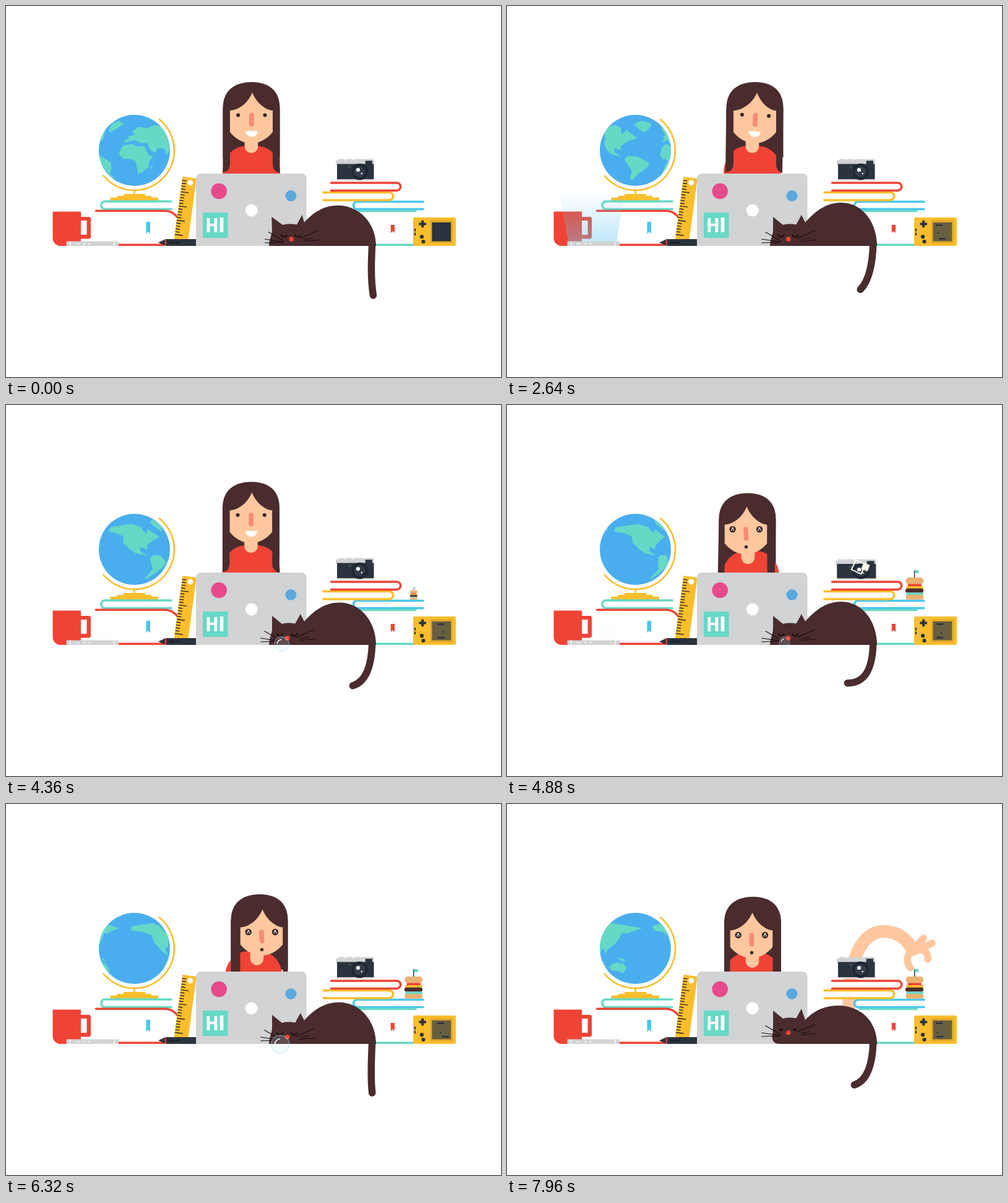
These frames come from a looping animation (800 px wide and 600 px high, 8000 ms). An HTML page:

```html
<!DOCTYPE html>
<html lang="en">
<head>
<meta charset="utf-8">
<title>Desk</title>
<style>
html, body { margin: 0; width: 100%; height: 100%; overflow: hidden; background: #fff; }
svg { display: block; width: 100vw; height: 100vh; }
.line { fill: none; stroke-width: 3.5; stroke-linecap: round; }
.red { fill: #ef4335; } .teal { fill: #66d9c6; } .yellow { fill: #fabe2c; }
.dark { fill: #2b333e; } .gray { fill: #d1d3d4; } .hair { fill: #4a2c2e; }
.skin { fill: #ffc79e; } .white { fill: #fff; }
</style>
</head>
<body>
<svg viewBox="0 0 800 600">
  <defs>
    <clipPath id="globeClip"><circle cx="207.5" cy="233.5" r="57.5"/></clipPath>
    <linearGradient id="glowFill" x1="0" y1="300" x2="0" y2="381" gradientUnits="userSpaceOnUse">
      <stop stop-color="#6ac9ee" stop-opacity="0"/>
      <stop offset="1" stop-color="#6ac9ee" stop-opacity=".42"/>
    </linearGradient>
  </defs>

  <!-- globe -->
  <circle cx="207.5" cy="233.5" r="57.5" fill="#4aaeee"/>
  <path id="land" class="teal" clip-path="url(#globeClip)"/>
  <path d="M248 183.5A64.5 64.5 0 1 1 157.5 274.5M207.5 298V306" class="line" stroke="#fabe2c" style="stroke-width:2.6"/>
  <path class="yellow" d="M190 304h35v3h10v2.700h11v5.500h-77.500v-5.500h11v-2.700h10.500z"/>

  <!-- left books -->
  <g class="line">
    <path d="M267 316H160a6.200 6.200 0 0 0 0 12.500H267" stroke="#66d9c6"/>
    <path d="M145.500 331.300H256C267 331.300 273 336 279 344M180 386.200H255" stroke="#ef4335"/>
  </g>
  <path d="M226.500 349h6.500v19.500l-3.200-3.500-3.300 3.500z" fill="#49c7ee"/>

  <!-- mug, phone, glow -->
  <path class="red" d="M75.500 332.500H121V341H134a3 3 0 0 1 3 3V373.500a3 3 0 0 1-3 3H121V388H88a12.500 12.500 0 0 1-12.500-12.500z"/>
  <path class="white" d="M121 347h9.500v23H121z"/>
  <path id="glow" d="M99 381L84 300H190.500L177 381z" fill="url(#glowFill)"/>
  <path class="gray" d="M97.500 380.500H182V388H97.500z"/>
  <path d="M103.500 380.500v7.500M175 380.500v7.500M112 384.500h7" stroke="#fff" stroke-width="1.200"/>
  <circle class="white" cx="126.500" cy="384.300" r="1.200"/><circle class="white" cx="134.500" cy="384.300" r="1.200"/>

  <!-- ruler and pen -->
  <g transform="translate(285.500 276) rotate(7.700)">
    <path class="yellow" d="M0 0H22.500V103H0z"/>
    <path id="ticks" stroke="#2b2320" stroke-width="1.400"/>
    <circle class="white" cx="13.500" cy="8" r="4.500"/>
  </g>
  <path class="dark" d="M246 382.500L258 377H312.500V379H316a2 2 0 0 1 2 2V384a2 2 0 0 1-2 2H312.500V388H258z"/>
  <path class="red" d="M256.800 377.500h2v10.300h-2z"/>
  <path d="M265 382.500h6M274 382.500h6" stroke="#1b212a" stroke-width="3" stroke-linecap="round"/>

  <!-- person -->
  <path id="hairBack" class="hair"/>
  <path id="body" class="red" d="M350 290V271C350 243 368 226.500 388 226.500H405C427 226.500 443 243 443 271V290z"/>
  <path id="neck" class="skin" d="M385.700 212H407.200V227a10.750 10.750 0 0 1-21.500 0z"/>
  <path id="face" class="skin"/>
  <path id="hairFront" class="hair"/>
  <g id="features">
    <g id="dotEyes" fill="#3b2426"><circle cx="375.200" cy="176.500" r="3"/><circle cx="418.500" cy="176.500" r="3"/></g>
    <path id="happyEyes" d="M369.500 179a5.700 5.700 0 0 1 11.400 0M412.800 179a5.700 5.700 0 0 1 11.400 0" class="line" stroke="#3b2426" style="stroke-width:2.600"/>
    <g id="bigEyes"></g>
    <rect id="nose" x="393" y="172.800" width="7.600" height="22.200" rx="3.800" fill="#f78b78"/>
    <path id="smile" class="white" d="M387.500 202.300H406.500C406.500 208 402 211.700 397 211.700S387.500 208 387.500 202.300z"/>
    <circle id="gasp" cx="397" cy="205" r="2.700" fill="#3b2426"/>
  </g>

  <!-- laptop -->
  <path class="gray" d="M307 388V279a8 8 0 0 1 8-8H477.500a8 8 0 0 1 8 8V388z"/>
  <circle cx="344.200" cy="299.500" r="12.800" fill="#e64a8b"/>
  <circle cx="460.500" cy="307" r="9" fill="#5aa9de"/>
  <circle class="white" cx="396.700" cy="330.500" r="10"/>
  <path class="teal" d="M318 334h40.500v41H318z"/>
  <g class="white" font-size="33" font-weight="900">
    <text x="323" y="366" font-family="'Noto Sans Mono', monospace">H</text>
    <text x="343.500" y="366" font-family="Roboto, sans-serif">I</text>
  </g>

  <!-- arm behind the right books -->
  <g id="arm">
    <path id="armLine" d="M552 334C553 295 556 270 562 252C572 218 592 206 608 206C628 206 645 215 655 236" fill="none" stroke="#ffc79e" stroke-width="20.500"/>
    <g id="hand"><path d="M-1 3L18-19M6 2L32-11M-3 29C-11 20-9 2 5-1C17-3 26 4 25 15" class="line" stroke="#ffc79e" style="stroke-width:11.500"/><circle class="skin" r="10"/></g>
  </g>

  <!-- right books -->
  <g class="line">
    <path d="M674 316.500H567.500a6 6 0 0 0 0 12H674" stroke="#49c7ee" fill="#fff"/>
    <path d="M570 331.500H662M595 386.200H662" stroke="#66d9c6"/>
    <path d="M513 301.500H619.500a6.200 6.200 0 0 1 0 12.400H513" stroke="#fabe2c" fill="#fff"/>
    <path d="M525.500 286H631.500a6.200 6.200 0 0 1 0 12.400H525.500" stroke="#ef4335" fill="#fff"/>
  </g>
  <path class="red" d="M621.800 354h6.200v13l-3.100-2.800-3.100 2.800z"/>

  <!-- camera -->
  <g id="camera">
    <path class="gray" d="M533 249.500H537V247.500H547V249.500H549V247.500H560V249.500H562V247.500H594.500V257H533zM535 279.500H594.500V282.500H535z"/>
    <path class="dark" d="M535 255.500H594.500V280H535zM580.700 250.300H592V259.500H580.700z"/>
    <circle cx="571.500" cy="268" r="13.300" fill="#1f2733"/><circle cx="571.500" cy="268" r="9" fill="#333d4b"/>
    <circle class="white" cx="569" cy="265" r="3.100"/><circle class="white" cx="574.700" cy="271" r="1.200"/>
    <circle cx="555.500" cy="260" r="2" fill="#45505c"/>
  </g>
  <g id="flash">
    <path d="M-8.500-8.500h17v17h-17z" transform="translate(568 262) rotate(25)" fill="none" stroke="#fff9ee" stroke-width="2"/>
    <path d="M-5.500-5.500h11v11h-11z" transform="translate(579.500 262) rotate(20)" fill="#fff9ee"/>
  </g>

  <!-- burger -->
  <g id="burger">
    <path d="M658.700 267V281" stroke="#2b333e" stroke-width="1.500"/>
    <path class="teal" d="M659.500 267h6v5h-6z"/>
    <rect x="644.500" y="279" width="28.500" height="11" rx="5" fill="#e9b072"/>
    <rect class="red" x="647.500" y="289.500" width="22.500" height="3.800" rx="1.500"/>
    <rect class="yellow" x="645" y="293" width="28" height="4" rx="1.500"/>
    <rect class="hair" x="644" y="296.700" width="29" height="6.800" rx="3"/>
    <rect class="teal" x="645" y="303.500" width="28" height="3.800" rx="1.500"/>
    <rect x="644.500" y="307" width="28.500" height="7.700" rx="3" fill="#e9b072"/>
  </g>

  <!-- handheld console -->
  <rect class="yellow" x="658" y="342" width="69" height="46" rx="2.500"/>
  <path d="M685.500 346.500h36.500v37h-36.500z" fill="#e3a829"/>
  <path id="screen" d="M688.500 350H719V380.500H688.500z"/>
  <path id="game" stroke="#2b333e" stroke-width="2.400"/>
  <path d="M667.500 352.500h11.500M673.200 346.800v11.400" stroke="#2b333e" stroke-width="4"/>
  <circle class="dark" cx="672" cy="373.200" r="3.100"/><circle class="dark" cx="674.500" cy="381" r="3.100"/>
  <path d="M661 360v4.500M661 366.500v4.500" stroke="#2b333e" stroke-width="2"/>

  <!-- cat -->
  <path id="tail" class="line" stroke="#4a2c2e" style="stroke-width:11.500"/>
  <path id="cat" class="hair"/>
  <g id="catFace" fill="none" stroke="#150c0d">
    <path d="M449 380L424 365.500M448 381.500L418 377M448 382L418 383M475 376L504 363.500M482 377.500L496 375.500M481 380.500L506 378.500" stroke-width="1.100"/>
    <path id="catShut" d="M445 369.500a4.500 4 0 0 0 9 0M467.500 369.500a4.500 4 0 0 0 9 0" stroke-width="2"/>
    <path id="catOpen" d="M446.500 372h5.500M469 372h5.500" stroke-width="3"/>
    <circle class="red" cx="461.200" cy="377" r="3.800" stroke="none"/>
  </g>
  <g id="bubble">
    <circle r="1" fill="#bfe4f0" fill-opacity=".18" stroke="#a6e0f2" stroke-opacity=".5" stroke-width=".09"/>
    <path d="M-.6-.08A.6.6 0 0 1-.08-.6" fill="none" stroke="#fff" stroke-opacity=".85" stroke-width=".14" stroke-linecap="round"/>
  </g>
</svg>
<script>
const LOOP = 8000;
const $ = Object.fromEntries([...document.querySelectorAll('[id]')].map(e => [e.id, e]));
const set = (el, name, value) => el.setAttribute(name, value);
const show = (el, on) => set(el, 'opacity', +on);
const mix = (a, b, k) => a + (b - a) * k;
const ramp = (t, from, to) => {
  const k = Math.min(1, Math.max(0, (t - from) / (to - from)));
  return k * k * (3 - 2 * k);
};
const bump = (t, start, length) => {
  const k = (t - start) / length;
  return k > 0 && k < 1 ? Math.sin(Math.PI * k) ** 2 : 0;
};
const wave = (t, period, phase = 0) => Math.sin(2 * Math.PI * (t / period + phase));

// Outlines as pairs: longitude, height from the globe's middle
const africa = [-14,6, -9,-5, -3,-9, 10,-10, 17,-6, 28,-7, 37,9, 45,9, 38,18, 38,27, 29,35, 20,38, 14,17, 4,14, -6,14];
const eurasia = [-5,-12, -4,-17, 3,-19, 1,-23, 12,-25, 8,-31, 20,-38, 39,-36, 64,-41, 121,-39, 158,-35, 175,-33, 158,-28,
  147,-24, 135,-25, 134,-17, 123,-5, 109,2, 104,9, 95,-1, 79,8, 70,-3, 54,-4, 47,4, 37,-2, 34,-11, 22,-12, 12,-17];
const australia = [101,30, 117,25, 130,22, 134,26, 138,22, 143,32, 133,40, 120,36, 102,36];
const northAmerica = [-161,-29, -162,-36, -141,-38, -110,-41, -89,-36, -87,-30, -81,-26, -76,-33, -55,-20, -72,-14, -82,-7,
  -83,0, -94,-4, -94,3, -80,11, -102,6, -113,-2, -122,-11, -123,-21, -137,-26];
const greenland = [-62,-43, -38,-48, -15,-43, -25,-37, -40,-29, -50,-33];
const southAmerica = [-76,13, -70,9, -55,10, -33,20, -36,28, -52,38, -66,48, -73,46, -65,32, -75,19];
const newGuinea = [128,16, 137,16, 146,20, 136,20];
const madagascar = [42,29, 47,22, 46,30];
const continents = [africa, eurasia, australia, northAmerica, greenland, southAmerica, newGuinea, madagascar];

const wrap = a => ((a % 360) + 540) % 360 - 180;
function outline(points, centre) {
  const lons = points.filter((_, i) => i % 2 === 0);
  const middle = (Math.min(...lons) + Math.max(...lons)) / 2;
  const base = wrap(middle - centre);
  return 'M' + lons.map((lon, i) => {
    const y = points[2 * i + 1];
    const angle = Math.max(-90, Math.min(90, base + lon - middle));
    const x = Math.sqrt(57.5 ** 2 - y * y) * Math.sin(angle * Math.PI / 180);
    return `${(207.5 + x).toFixed(2)} ${233.5 + y}`;
  }).join('L') + 'z';
}

// Pose: hair x, hair y, face x, face y, tilt, nose tilt, hair end x, neck x
const rest = [0, 0, 0, 0, 0, 0, 0, 0];
const lean = [4, 0, 4, 0.3, 2.8, 0, 2.5, 0];
const duckLeft = [-8, 19.5, -10.5, 24.5, 0, -4, -10, -7];
const duckRight = [13, 23, 16.5, 30.5, 0, -5, 13, 9];
const duck = [0.5, 27, -1.5, 35.5, 0, 0, 0.5, 0];
const moves = [[900, 1250, lean], [2750, 3150, rest], [4300, 4700, duckLeft], [5950, 6320, duckRight], [6950, 7350, duck]];

function drawPerson(t) {
  let pose = rest;
  for (const [from, to, next] of moves) {
    const k = ramp(t, from, to);
    pose = pose.map((v, i) => mix(v, next[i], k));
  }
  const [dx, dy, fx, fy, tilt, noseTilt, ex, nx] = pose;
  const left = 350.5 + dx, right = 442.5 + dx, shoulder = 165 + dy, end = 269 + dy;
  const inL = 362 + fx, inR = 431 + fx, fringe = 169 + fy, part = 398 + fx + tilt * 0.7;
  set($.hairBack, 'd', `M${left} ${245 + dy}V${shoulder}C${left} ${139 + dy} ${367 + dx} ${123 + dy} ${397 + dx} ${123 + dy}
    S${right} ${139 + dy} ${right} ${shoulder}V${245 + dy}z`);
  set($.face, 'd', `M${part} ${140 + fy}C${part - 7} ${157 + fy} ${inL + 15} ${168 + fy} ${inL} ${fringe}V${204 + dy}
    C${inL + 10} ${216 + dy} ${inL + 22} ${222 + dy} ${inL + 34.5} ${222 + dy}S${inR - 10} ${216 + dy} ${inR} ${204 + dy}
    V${fringe}C${inR - 12} ${168 + fy} ${part + 7} ${157 + fy} ${part} ${140 + fy}z`);
  set($.hairFront, 'd', `M${left} ${shoulder}L${350.5 + ex} ${end}Q${inL - 1} ${end - 1} ${inL} ${end - 12}V${fringe - 4}z
    M${right} ${shoulder}L${442.5 + ex} ${end + 1}Q${inR + 1} ${end - 1} ${inR} ${end - 12}V${fringe - 4}z`);
  set($.body, 'transform', `translate(${nx * 0.4} ${dy * 0.5})`);
  set($.neck, 'transform', `translate(${nx} ${dy})`);
  set($.features, 'transform', `translate(${fx} ${fy}) rotate(${tilt} 397 190)`);
  set($.nose, 'transform', `rotate(${noseTilt} 397 184)`);

  const amazed = t > 4450, happy = t > 3250 && t < 4250;
  show($.dotEyes, !amazed && !happy);
  show($.happyEyes, happy);
  show($.bigEyes, amazed);
  show($.smile, !amazed);
  show($.gasp, amazed);
}

function drawCat(t) {
  const awake = ramp(t, 7150, 7450);
  const breath = ramp(t, 900, 1350) * (1 - awake);
  const inhale = Math.cos(Math.PI * (t - 2640) / 2240) ** 2;
  const b = breath * (0.25 + 0.75 * inhale);
  const top = 322.5 - 4.5 * b + 3.5 * awake, mid = 536 + 4 * b;
  const x = 3.5 * awake, up = -7 * awake, slide = -6.5 * ramp(t, 950, 2400);
  const corner = 12 * awake, ear = slide * 0.4;
  set($.cat, 'd', `M${425 + x + corner} 388Q${425 + x} 388 ${425 + x} ${388 - corner}
    C${425 + x} 378 430 370 430 ${362 + up}L${429.3 - ear * 0.3} ${341 + up}L${447 + ear * 0.4} ${354 + up}
    Q${458 + ear} ${351.5 + up} ${470 + ear} ${353.500 + up}L${478.5 + ear} ${338 + up}L482 ${350 + up * 0.1}
    C497 333 515 ${top} ${mid} ${top}C${mid + 36} ${top} 598 352 598 388z`);
  set($.catFace, 'transform', `translate(${slide} ${up})`);
  show($.catShut, awake < 0.5);
  show($.catOpen, awake >= 0.5);

  const swing = bump(t, 1150, 2000) + bump(t, 3450, 2700) + bump(t, 6150, 2700);
  const m = (a, c) => mix(a, c, swing);
  set($.tail, 'd', `M591.800 384C${m(590.5, 591)} ${m(410, 425)} ${m(589, 580)} ${m(440, 450)} ${m(593.5, 550)} ${m(468, 449.5)}`);

  const r = (16 - 7.5 * inhale) * ramp(t, 2850, 4100);
  set($.bubble, 'transform', `translate(${455 - r * 0.8} ${377 + r * 0.8}) scale(${r})`);
  show($.bubble, r > 0.5 && t < 7150);
}

const armLength = $.armLine.getTotalLength();
function drawArm(t) {
  const k = ramp(t, 7400, 7900), reach = k * armLength;
  show($.arm, k > 0);
  set($.armLine, 'stroke-dasharray', `${reach} ${armLength + 10}`);
  const heading = s => {
    const a = $.armLine.getPointAtLength(Math.max(0, s - 2)), b = $.armLine.getPointAtLength(Math.max(2, s));
    return Math.atan2(b.y - a.y, b.x - a.x) * 180 / Math.PI;
  };
  const tip = $.armLine.getPointAtLength(reach);
  set($.hand, 'transform', `translate(${tip.x} ${tip.y}) rotate(${heading(reach) - heading(armLength)})`);
}

function drawThings(t) {
  set($.land, 'd', continents.map(c => outline(c, 12 - 0.0265 * t)).join(''));
  show($.glow, 0);
  set($.glow, 'opacity', ramp(t, 350, 750) * (1 - 0.97 * ramp(t, 2750, 3500)) * (1 - ramp(t, 4500, 6500)));

  const on = t > 1900;
  set($.screen, 'fill', on ? '#675f41' : '#2b333e');
  show($.game, on);
  const ballX = 701 + 6 * wave(t, 2600, 0.6), ballY = 365 + 5 * wave(t, 1700, 0.5);
  const upper = 695.5 + 2.5 * wave(t, 2600, 0.7), lower = 699.5 + 5.5 * wave(t, 2900, 0.05);
  set($.game, 'd', `M${upper} 354.500h11M${lower} 376.300h11M${ballX - 1.2} ${ballY}h2.400`);

  const snap = bump(t, 4680, 400);
  set($.camera, 'transform', `translate(564 282.500) scale(${1 + 0.06 * snap} ${1 - 0.06 * snap}) translate(-564 -282.500)`);
  set($.flash, 'opacity', snap);
  const size = ramp(t, 4250, 4500);
  set($.burger, 'transform', `translate(659 314.700) scale(${size}) translate(-659 -314.700)`);
}

set($.ticks, 'd', Array.from({ length: 20 }, (_, i) => `M0 ${6 + i * 4.65}h${i % 5 === 4 ? 13 : 7}`).join(''));
$.bigEyes.innerHTML = [375.2, 418.5].map(x => `<circle cx="${x}" cy="176.500" r="5.200" fill="#3b2426"/>` +
  [[0, -1.8, 1.5], [-1.8, 1.3, 1], [1.8, 1.3, 1]].map(([dx, dy, r]) =>
    `<circle class="white" cx="${x + dx}" cy="${176.5 + dy}" r="${r}"/>`).join('')).join('');

function frame() {
  const t = performance.now() % LOOP;
  drawThings(t);
  drawPerson(t);
  drawCat(t);
  drawArm(t);
  requestAnimationFrame(frame);
}
frame();
</script>
</body>
</html>
```
